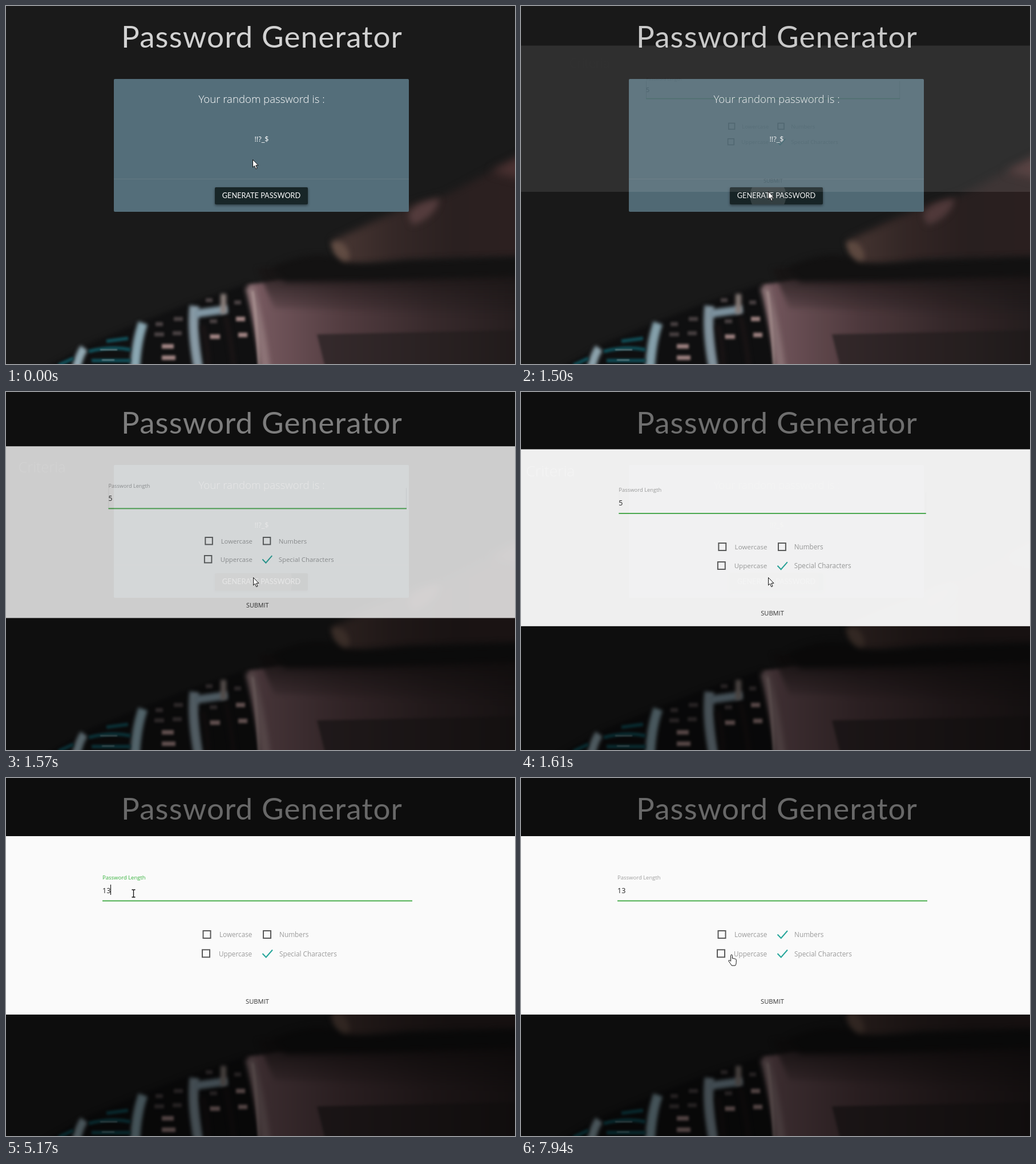
An HTML page with a canvas for the animation above (8 s loop, 892 by 628 pixels).

```html
<!DOCTYPE html>
<html lang="en">
<head>
<meta charset="utf-8">
<title>Password Generator</title>
<style>
html, body { margin: 0; width: 100%; height: 100%; overflow: hidden; background: #1a1a1a; }
canvas { display: block; }
</style>
</head>
<body>
<canvas id="stage" width="892" height="628"></canvas>
<script>
const W = 892, H = 628, LOOP = 8000;
const SANS = '"Open Sans", "Noto Sans", sans-serif', ROUND = 'Lato, sans-serif';
const stage = document.getElementById('stage').getContext('2d');
const layer = () => Object.assign(document.createElement('canvas'), { width: W, height: H }).getContext('2d');
const photo = layer(), modal = layer();
const clamp = v => Math.min(1, Math.max(0, v));

function text(g, str, x, y, size, color, { font = SANS, weight = 400, align = 'left', gap = 0 } = {}) {
  g.font = `${weight} ${size}px ${font}`;
  g.letterSpacing = gap + 'px';
  g.textAlign = align;
  g.fillStyle = color;
  g.fillText(str, x, y);
}

function gradient(g, x0, y0, x1, y1, ...colors) {
  const fill = g.createLinearGradient(x0, y0, x1, y1);
  colors.forEach((c, i) => fill.addColorStop(i / (colors.length - 1), c));
  return fill;
}

// Soft stand-in for the dark photograph behind the page
function paintPhoto(g) {
  const shape = (d, fill, blur) => {
    g.filter = `blur(${blur}px)`;
    g.fillStyle = fill;
    g.fill(new Path2D(d));
  };
  const line = (d, color, width, blur) => {
    g.filter = `blur(${blur}px)`;
    g.strokeStyle = color;
    g.lineWidth = width;
    g.stroke(new Path2D(d));
  };
  g.fillStyle = '#1a1a1a';
  g.fillRect(0, 0, W, H);
  shape('M422 490L500 476L930 465V660H446Z', gradient(g, 440, 0, W, 0, '#76595f', '#523c40', '#382a2c', '#261e1f'), 3);
  shape('M440 460H930V545L470 530Z', gradient(g, 0, 465, 0, 545, 'rgba(24,20,20,.8)', 'rgba(24,20,20,0)'), 4);
  shape('M545 576L930 568V660H566Z', gradient(g, 545, 0, W, 0, '#352a2c', '#211b1b'), 2);
  shape('M572 412L640 380L720 345L770 332L860 285L930 250V440L700 446L592 456Z',
    gradient(g, 570, 0, W, 0, '#4a3834', '#352827', '#2a2020', '#2c2020'), 7);
  shape('M705 368Q712 345 760 338Q752 372 712 384Z', '#543c3d', 6);
  shape('M850 290L930 250V310Z', '#4a3131', 8);
  shape('M570 414Q590 408 600 430Q606 450 590 455Q574 440 570 414Z', '#614c43', 5);
  shape('M465 460Q520 430 575 440Q600 462 700 448L930 440V472L650 482L490 484Z', '#131212', 6);
  shape('M60 640L145 592L240 553L330 518L424 487L446 640Z', '#101011', 4);
  line('M427 492Q446 560 456 640', '#8d7477', 16, 4);
  line('M432 500Q440 550 444 640', '#b09a98', 3, 2);
  line('M330 526Q325 570 338 640', '#8799a4', 17, 3);
  line('M330 540L388 532', '#8298a5', 14, 3);
  line('M381 505V540', '#8c807c', 10, 3);
  line('M240 556Q228 590 226 640', '#8aa7b2', 17, 3);
  line('M137 600Q128 612 122 640', '#93aab4', 15, 3);
  line('M145 606Q185 596 218 603M150 622H218M176 588L214 583', '#11525c', 6, 2);
  line('M92 630L118 618', '#11525c', 6, 2);
  line('M165 603H195M168 621H190', '#6e8c92', 2, 1);
  line('M273 597H294M273 617H297M357 580H375M403 549H419M407 577H423', '#9f8382', 8, 2);
  line('M260 576H277M262 558H275M294 549H310M292 574H308M357 553H370M350 516H362M400 520H412', '#4b4344', 7, 2);
  line('M345 560Q355 600 354 640M385 545Q395 590 400 640', '#191415', 9, 3);
  g.filter = 'none';
}
paintPhoto(photo);

function drawPage(g, t) {
  g.drawImage(photo.canvas, 0, 0);
  text(g, 'Password Generator', 448.5, 73, 53, '#d2d2d2', { font: ROUND, align: 'center', gap: 1.1 });
  g.fillStyle = '#546e7a';
  g.beginPath();
  g.roundRect(189, 128, 517, 233, 2);
  g.fill();
  g.fillStyle = 'rgba(160,160,160,.22)';
  g.fillRect(189, 303, 517, 1);
  text(g, 'Your random password is :', 448, 170, 18.6, '#fff', { weight: 300, align: 'center' });
  text(g, '!!?_$', 448, 237.5, 12.7, '#fff', { align: 'center' });

  g.save();
  g.beginPath();
  g.roundRect(366, 318, 163, 30, 2);
  g.shadowColor = 'rgba(0,0,0,.45)';
  g.shadowBlur = 4;
  g.shadowOffsetY = 2;
  g.fillStyle = '#182628';
  g.fill();
  g.shadowColor = 'transparent';
  if (t > 1440 && t < 1780) {
    g.clip();
    g.fillStyle = `rgba(255,255,255,${.13 * clamp((1780 - t) / 200)})`;
    g.beginPath();
    g.arc(433, 333, (t - 1440) * .52, 0, 7);
    g.fill();
  }
  g.restore();
  text(g, 'GENERATE PASSWORD', 447.5, 337, 12.7, '#fff', { font: ROUND, align: 'center' });
}

function checkbox(g, x, y, tick) {
  g.lineWidth = 2;
  if (tick < 1) {
    g.globalAlpha = 1 - tick;
    g.strokeStyle = '#5a5a5a';
    g.strokeRect(x + 1, y + 1, 13, 13);
  }
  if (tick > 0) {
    g.globalAlpha = tick;
    g.strokeStyle = '#26a69a';
    g.beginPath();
    g.moveTo(x - .5, y + 7.5);
    g.lineTo(x + 5.7, y + 14);
    g.lineTo(x + 17, y + 1);
    g.stroke();
  }
  g.globalAlpha = 1;
}

// Ranges in which the text caret is lit
const carets = [[2690, 3190, 176], [3740, 4240, 169], [4610, 5170, 176], [5170, 5730, 183], [6230, 6730, 183]];

function drawModal(g, t, p) {
  const s = .8 + .2 * p;
  g.setTransform(1, 0, 0, 1, 0, 0);
  g.clearRect(0, 0, W, H);
  g.setTransform(s, 0, 0, s, 447 * (1 - s), 66 + 36 * p - 102 * s);
  g.fillStyle = '#fafafa';
  g.fillRect(-200, 102, 1300, 313);
  if (p < 1) {
    text(g, 'Criteria', 5, 149.5, 26.4, '#fff', { weight: 300 });
    g.fillStyle = `rgba(90,90,90,${.6 * (1 - p)})`;
    g.fillRect(169, 178, 1, 38);
    g.fillRect(711, 178, 1, 38);
  }

  const focus = clamp((t - 2690) / 140) * (1 - clamp((t - 6980) / 140));
  const mix = (a, b) => Math.round(a + (b - a) * focus);
  text(g, 'Password Length', 169, 177.5, 9.5, `rgb(${mix(158, 56)},${mix(158, 178)},${mix(158, 62)})`);
  const value = t < 3500 ? '5' : t < 4610 ? '' : t < 5170 ? '1' : '13';
  text(g, value, 169, 201.8, 12.5, '#222');
  g.fillStyle = '#4caf50';
  g.fillRect(169, 214.5, 543, 2);
  g.fillStyle = '#000';
  for (const [from, to, x] of carets) if (t >= from && t < to) g.fillRect(x, 187, 1, 18);

  checkbox(g, 344.5, 267, 0);
  checkbox(g, 450, 267, clamp((t - 6980) / 150));
  checkbox(g, 343, 300.3, 0);
  checkbox(g, 450, 300.5, 1);
  const grey = '#9b9b9b';
  text(g, 'Lowercase', 374, 279.3, 11.7, grey);
  text(g, 'Numbers', 479, 279.3, 11.8, grey);
  text(g, 'Uppercase', 373, 312.8, 11.7, grey);
  text(g, 'Special Characters', 479, 312.8, 11.8, grey);
  text(g, 'SUBMIT', 440.5, 395.6, 11.2, '#343434', { align: 'center' });
}

// Pointer stops: time, x, y
const stops = [
  [0, 432, 269], [50, 432, 269], [170, 438, 257], [350, 438, 257], [560, 440, 219], [1030, 433, 325],
  [1960, 433, 325], [2480, 222, 198], [3010, 222, 198], [3010, 223.5, 202.5], [5910, 223.5, 202.5],
  [6670, 449, 273], [6730, 450, 274], [6760, 451, 274], [7080, 451, 274], [7320, 368, 310],
  [7940, 368, 310], [7940, 369, 309.5], [LOOP, 369, 309.5]
];
const arrow = new Path2D('M.5 .5V14L3.5 11.2L5.7 16.7L8 15.8L5.8 10.4H10Z');
const beam = new Path2D('M-3-6.5H-1Q0-6.5 0-5.5Q0-6.5 1-6.5H3M-3 6.5H-1Q0 6.5 0 5.5Q0 6.5 1 6.5H3M0-5.5V5.5');
const hand = new Path2D('M-1.4 11V2a1.4 1.4 0 0 1 2.8 0V7q1.4-1 2.6.5q1.2-.8 2.2.6q1.6-.6 2 1V14q0 3-1.6 5.5H.2Q-1.5 16.5-5 12q-.6-1.8 1-1.8q1.5.3 2.6 1.8Z');

function drawPointer(g, t) {
  const i = stops.findIndex(s => s[0] > t);
  const [t0, x0, y0] = stops[i - 1], [t1, x1, y1] = stops[i];
  const u = (t - t0) / (t1 - t0), k = u * u * (3 - 2 * u);
  g.save();
  g.translate(x0 + (x1 - x0) * k, y0 + (y1 - y0) * k);
  g.lineWidth = 1;
  g.strokeStyle = '#111';
  g.fillStyle = '#fff';
  if (t >= 2350 && t < 6060) {
    g.lineWidth = 1.3;
    g.stroke(beam);
  } else {
    const shape = t < 6560 ? arrow : hand;
    g.fill(shape);
    g.stroke(shape);
  }
  g.restore();
}

function frame(now) {
  const t = now % LOOP;
  const p = 1 - (1 - clamp((t - 1495) / 178)) ** 3;
  drawPage(stage, t);
  if (p > 0) {
    stage.fillStyle = `rgba(0,0,0,${.5 * p})`;
    stage.fillRect(0, 0, W, H);
    drawModal(modal, t, p);
    stage.globalAlpha = p;
    stage.drawImage(modal.canvas, 0, 0);
    stage.globalAlpha = 1;
  }
  drawPointer(stage, t);
}

const start = performance.now();
(function tick() {
  frame(performance.now() - start);
  requestAnimationFrame(tick);
})();
</script>
</body>
</html>
```
